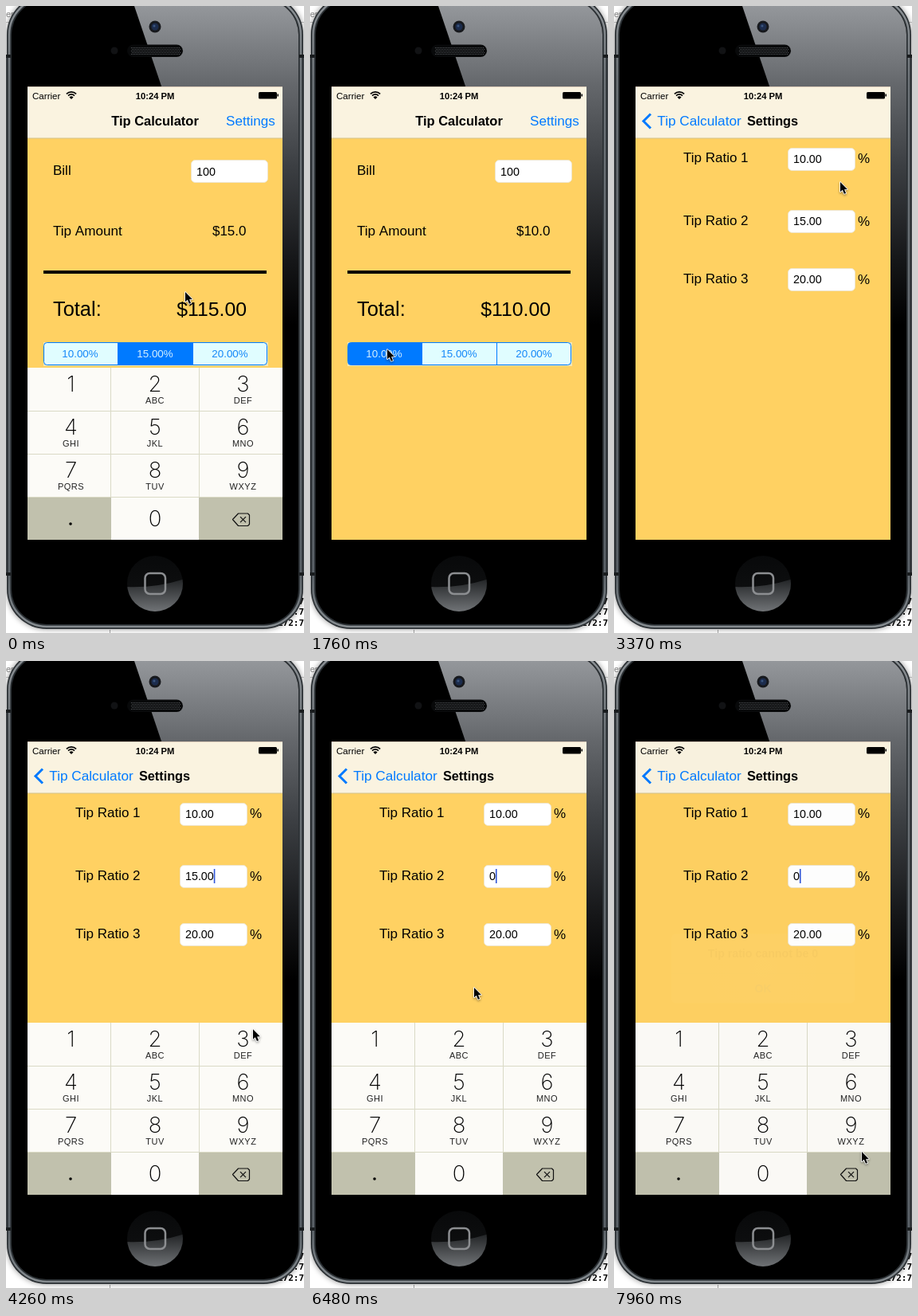
These frames come from a looping animation (374x787 px, 8 s). An HTML page with a canvas:

```html
<!DOCTYPE html>
<html lang="en">
<head>
<meta charset="utf-8">
<title>Tip Calculator</title>
<style>
html, body { margin: 0; width: 100%; height: 100%; overflow: hidden; background: #fff; }
canvas { display: block; width: 374px; height: 787px; }
</style>
</head>
<body>
<canvas id="stage" width="374" height="787"></canvas>
<script>
const canvas = document.getElementById('stage');
const W = 374, H = 787, LOOP = 8000;
const ratio = window.devicePixelRatio || 1;
canvas.width = W * ratio;
canvas.height = H * ratio;
let c = canvas.getContext('2d');

const SANS = '"Liberation Sans", Arial, sans-serif';
const THIN = 'Inter, "Liberation Sans", sans-serif';
const MONO = '"DejaVu Sans Mono", monospace';
const BLUE = '#007aff', YELLOW = '#ffd162', BAR = '#faf3e0', KEY = '#fcfbf7', GREY = '#c1c1ad';

const clamp = v => Math.max(0, Math.min(1, v));
const mix = (a, b, p) => a + (b - a) * p;
const ease = v => { const p = clamp(v); return p * p * (3 - 2 * p); };

function text(s, x, y, size, o = {}) {
  c.font = `${o.weight || 400} ${size}px ${o.family || SANS}`;
  c.textAlign = o.align || 'left';
  c.letterSpacing = (o.space || 0) + 'px';
  c.fillStyle = o.color || '#000';
  c.fillText(s, x, y);
  c.letterSpacing = '0px';
}

function box(x, y, w, h, color) {
  c.fillStyle = color;
  c.fillRect(x, y, w, h);
}

function round(x, y, w, h, r, fill, stroke, width = 1) {
  c.beginPath();
  c.roundRect(x, y, w, h, r);
  if (fill) { c.fillStyle = fill; c.fill(); }
  if (stroke) { c.strokeStyle = stroke; c.lineWidth = width; c.stroke(); }
}

function disc(x, y, r, fill) {
  c.beginPath();
  c.arc(x, y, r, 0, Math.PI * 2);
  c.fillStyle = fill;
  c.fill();
}

function path(points, close) {
  c.beginPath();
  points.forEach(([x, y], i) => i ? c.lineTo(x, y) : c.moveTo(x, y));
  if (close) c.closePath();
}

function layer(alpha, draw) {
  if (alpha <= 0) return;
  c.save();
  c.globalAlpha *= alpha;
  draw();
  c.restore();
}

function ramp(x0, y0, x1, y1, stops) {
  const g = c.createLinearGradient(x0, y0, x1, y1);
  stops.forEach(([p, color]) => g.addColorStop(p, color));
  return g;
}

// ---- phone ----
function homeButton() {
  disc(187, 725, 35, ramp(0, 690, 0, 730, [[0, '#08090a'], [1, '#0d0e0f']]));
  c.save();
  c.beginPath();
  c.arc(187, 725, 35, 0, Math.PI * 2);
  c.clip();
  c.beginPath();
  c.moveTo(150, 729);
  c.quadraticCurveTo(187, 731, 224, 719);
  c.lineTo(224, 762);
  c.lineTo(150, 762);
  c.fillStyle = ramp(0, 720, 0, 760, [[0, '#232527'], [1, '#707376']]);
  c.fill();
  c.restore();
  round(174.5, 712, 25.5, 26, 6, null, '#8c8e91', 2.5);
}

function phone() {
  box(0, 0, W, H, '#fff');
  text('er.', 0, 14, 11, { color: '#888' });
  box(0, 20, W, 1, '#c8c8c8');
  box(130, 783, 1, 4, '#aaa');
  [[':7', 751], ['.:7', 764], ['172:7', 778]].forEach(([s, y]) =>
    text(s, 374, y, 11, { weight: 700, family: MONO, align: 'right' }));

  box(0, 62, 3, 652, '#50565b');
  box(371, 62, 3, 652, '#50565b');
  c.save();
  c.shadowColor = 'rgba(0,0,0,.45)';
  c.shadowBlur = 7;
  round(1, -14, 372, 796, 50, '#2b3034');
  c.restore();
  round(4, -11, 366, 790, 47, null, ramp(0, 0, 0, 787,
    [[0, '#8b9094'], [0.12, '#6d7378'], [0.9, '#5d646a'], [1, '#8a9094']]), 2.5);
  [0, 368].forEach(x => [61, 711].forEach(y => box(x, y, 6, 4, '#191c1e')));

  c.save();
  round(7, -8, 360, 784, 44, '#000');
  c.clip();
  path([[161, 0], [374, 0], [374, 630]], true);
  c.fillStyle = ramp(0, 0, 0, 400, [[0, '#94979b'], [0.25, '#64676b'],
    [0.5, '#3c3f43'], [0.8, '#151618'], [1, '#000']]);
  c.fill();
  c.restore();

  disc(187, 26, 7.5, '#17191d');
  disc(187, 26, 4.5, '#1c2c4d');
  disc(186, 25, 1.5, '#3a5680');
  disc(136, 56, 4.5, '#111214');
  round(152, 48.5, 70, 15.5, 8, '#08090a');
  for (let y = 52; y < 61; y += 2)
    for (let x = 157; x < 218; x += 2) box(x + (y % 4) / 2, y, 1, 1, '#55585c');
  homeButton();
}

// ---- app ----
function field(x, y, w, value, baseline) {
  round(x, y, w, 28, 5, '#fff', '#efe5cc');
  text(value, x + 6.5, baseline, 14.3);
}

function segments(chosen) {
  const edges = [47.5, 140.5, 234.5, 327.5];
  box(47, 422, 282, 30, '#f5e6b4');
  c.save();
  c.beginPath();
  c.roundRect(47.5, 422.5, 280, 28, 4);
  c.clip();
  box(47, 422, 282, 30, '#e0fdff');
  box(edges[chosen], 422, edges[chosen + 1] - edges[chosen], 30, BLUE);
  box(140, 422, 1, 30, BLUE);
  box(234, 422, 1, 30, BLUE);
  c.restore();
  round(47.5, 422.5, 280, 28, 4, null, BLUE);
  ['10.00%', '15.00%', '20.00%'].forEach((s, i) =>
    text(s, 93 + i * 94, 441, 13.4, { align: 'center', color: i === chosen ? '#d4f0ff' : '#1688f8' }));
}

function calculator(chosen) {
  box(27, 166, 320, 504, YELLOW);
  text('Bill', 59, 212, 17);
  field(232.5, 193.5, 96, '100', 213);
  text('Tip Amount', 59, 288, 17.1);
  text(chosen ? '$15.0' : '$10.0', 301.5, 288, 17, { align: 'right' });
  box(47, 332, 280, 4, '#000');
  text('Total:', 59, 389, 25.4);
  text(chosen ? '$115.00' : '$110.00', 302, 389, 24.8, { align: 'right' });
  segments(chosen);
}

function settings(ratio2, caret, caretColor) {
  box(27, 166, 320, 504, YELLOW);
  [[178, '10.00'], [256, ratio2], [329, '20.00']].forEach(([y, value], i) => {
    const base = y + 18.5 + (i ? 0.5 : 0);
    text('Tip Ratio ' + (i + 1), 87, base - 0.5, 17);
    field(218.5, y + 0.5, 84, value, base);
    if (i === 1 && caret) {
      c.font = '14.3px ' + SANS;
      c.textAlign = 'left';
      box(225 + c.measureText(value).width, 261, 1.6, 18, caretColor);
    }
    text('%', 306, base + 0.5, 17);
  });
}

function statusBar() {
  text('Carrier', 33, 117, 11.6);
  c.strokeStyle = '#000';
  c.lineWidth = 1.7;
  [5.6, 8.6].forEach(r => {
    c.beginPath();
    c.arc(82, 116.5, r, -Math.PI * 0.75, -Math.PI * 0.25);
    c.stroke();
  });
  c.beginPath();
  c.moveTo(82, 117);
  c.arc(82, 117, 3.6, -Math.PI * 0.75, -Math.PI * 0.25);
  c.fillStyle = '#000';
  c.fill();
  text('10:24 PM', 187, 117, 11.2, { weight: 700, align: 'center' });
  round(317, 108, 23, 8.5, 1.5, '#000');
  box(340.5, 110.5, 1.5, 3, '#000');
}

function navBar(push, pressed, tint) {
  box(27, 101, 320, 65, BAR);
  box(27, 101, 320, 1, '#d9c9b8');
  box(27, 165.5, 320, 1, '#d3c18c');
  statusBar();
  const slide = mix(187, 107, push);
  layer(1 - push, () => {
    text('Tip Calculator', slide, 150, 16.5, { weight: 700, align: 'center' });
    layer((pressed ? 0.2 : 1) * (1 - push), () => text('Settings', 276, 150, 17.1, { color: BLUE }));
  });
  layer(push, () => {
    text('Tip Calculator', slide, 150, 17.2, { align: 'center', color: tint });
    text('Settings', mix(347, 199, push), 150, 16.3, { weight: 700, align: 'center' });
    path([[46, 135.5], [37, 144.5], [46, 153.5]]);
    c.strokeStyle = tint;
    c.lineWidth = 3;
    c.stroke();
  });
}

function keyboard(drop, pressed) {
  if (drop >= 216) return;
  const letters = ['', 'ABC', 'DEF', 'GHI', 'JKL', 'MNO', 'PQRS', 'TUV', 'WXYZ'];
  const mids = [81.5, 187, 297.5];
  c.save();
  c.translate(0, drop);
  box(27, 454, 320, 216, KEY);
  box(27, 616, 105, 54, GREY);
  if (pressed !== 'delete') box(242, 616, 105, 54, GREY);
  if (pressed === '0') box(132, 616, 110, 54, GREY);
  [508, 562, 616].forEach(y => box(27, y, 320, 1, '#dadac6'));
  box(131, 454, 1, 162, '#dadac6');
  box(242, 454, 1, 162, '#dadac6');
  const digit = (s, x, y) => text(s, x, y, 27.5, { weight: 250, family: THIN, align: 'center' });
  letters.forEach((s, i) => {
    const x = mids[i % 3], y = 484 + 54 * Math.floor(i / 3);
    digit(String(i + 1), x, y);
    text(s, x, y + 15, 11, { align: 'center', space: 0.5, color: '#222' });
  });
  digit('0', 187, 653);
  disc(81, 650, 1.8, '#000');
  path([[284.5, 644.5], [291.5, 637], [303.5, 637], [305.5, 639], [305.5, 650.5],
    [303.5, 652.5], [291.5, 652.5]], true);
  c.strokeStyle = '#111';
  c.lineWidth = 1.2;
  c.lineJoin = 'round';
  c.stroke();
  path([[294, 641.2], [301, 648.2]]);
  c.stroke();
  path([[301, 641.2], [294, 648.2]]);
  c.stroke();
  c.restore();
}

function alertBox(alpha, scale, pressed) {
  layer(alpha * 0.37, () => box(27, 101, 320, 569, '#000'));
  layer(alpha, () => {
    c.translate(187, 386);
    c.scale(scale, scale);
    c.translate(-187, -386);
    round(49, 333.5, 276, 105, 7, 'rgba(240,234,218,.9)');
    const glow = c.createRadialGradient(187, 385, 10, 187, 385, 110);
    glow.addColorStop(0, 'rgba(255,252,242,.45)');
    glow.addColorStop(1, 'rgba(255,252,242,0)');
    round(49, 333.5, 276, 105, 7, glow);
    if (pressed) round(49, 394, 276, 44.5, [0, 0, 7, 7], 'rgba(190,184,165,.5)');
    box(49, 393, 276, 1, '#cfc7ae');
    text('Tip ratio cannot be 0', 187, 369, 17, { weight: 700, align: 'center', color: '#111' });
    text('OK', 187, 422, 16.8, { weight: 700, align: 'center', color: BLUE });
  });
}

// ---- pointer: [step, x, y] ----
const route = [
  [0, 225, 359], [1, 225, 359], [5, 301, 167], [7, 300, 150], [8, 280, 185],
  [11, 100, 428], [13, 94, 434], [16, 296, 119], [17, 296, 132], [19, 296, 138],
  [20, 296, 140], [23, 284, 221], [25, 262, 265], [27, 262, 267], [30, 334, 560],
  [32, 296, 640], [38, 296, 640], [40, 226, 643], [41, 192, 643], [42, 192, 643],
  [44, 206, 410], [50, 206, 410], [54, 311, 616]
];

function pointer(n) {
  const i = Math.max(1, route.findIndex(k => k[0] >= n));
  const [n0, x0, y0] = route[i - 1], [n1, x1, y1] = route[i];
  const p = clamp((n - n0) / (n1 - n0));
  c.save();
  c.translate(mix(x0, x1, p), mix(y0, y1, p));
  c.scale(0.82, 0.82);
  path([[0, 0], [0, 15], [3.4, 12], [6, 18], [8.6, 17], [6.2, 11.2], [10.8, 11]], true);
  c.shadowColor = 'rgba(0,0,0,.4)';
  c.shadowBlur = 3;
  c.shadowOffsetY = 1.5;
  c.lineJoin = 'round';
  c.lineWidth = 2;
  c.strokeStyle = '#fff';
  c.stroke();
  c.shadowColor = 'transparent';
  c.fillStyle = '#000';
  c.fill();
  c.restore();
}

const deletes = [33, 34, 35, 37, 38];

function ratioText(n) {
  if (n >= 42) return '0';
  return '15.00'.slice(0, 5 - deletes.filter(k => n >= k).length);
}

function app(n) {
  const push = ease((n - 18.8) / 3.2);
  const edge = 320 * (1 - push);
  const gone = clamp((n - 50) / 4.1);
  const shown = n < 46 ? 0 : n < 47 ? 0.5 : 1 - gone;
  const dimmed = shown > 0.4;

  c.save();
  c.beginPath();
  c.rect(27, 101, 320, 569);
  c.clip();
  if (push < 1) {
    c.save();
    c.translate(-96 * push, 0);
    calculator(n < 12 ? 1 : 0);
    c.restore();
    layer(0.1 * push, () => box(27, 166, 320, 504, '#000'));
  }
  if (push > 0) {
    c.save();
    c.translate(edge, 0);
    if (push < 1) box(19, 166, 8, 504, ramp(19, 0, 27, 0, [[0, 'rgba(0,0,0,0)'], [1, 'rgba(0,0,0,.22)']]));
    const caret = n >= 26 && n !== 30 && n !== 31;
    settings(ratioText(n), caret, dimmed ? '#555' : '#2f55d8');
    c.restore();
  }
  navBar(push, n >= 18, dimmed ? '#8f8c84' : BLUE);

  const drop = n < 20 ? ease((n - 0.5) / 4) : 1 - ease((n - 25.5) / 3.5);
  keyboard(216 * drop, deletes.includes(n) ? 'delete' : n === 42 ? '0' : '');
  alertBox(shown, n < 47 ? 1.12 : 1 - 0.17 * gone, n === 50);
  c.restore();
}

// The phone never changes, so it is painted once.
const backdrop = document.createElement('canvas');
backdrop.width = canvas.width;
backdrop.height = canvas.height;
const main = c;
c = backdrop.getContext('2d');
c.scale(ratio, ratio);
phone();
c = main;
c.scale(ratio, ratio);

function draw(now) {
  const n = Math.min(54, Math.floor((now % LOOP + 35) / 147.4));
  c.drawImage(backdrop, 0, 0, W, H);
  app(n);
  pointer(n);
}

const start = performance.now();
function tick() {
  draw(performance.now() - start);
  requestAnimationFrame(tick);
}
tick();
</script>
</body>
</html>
```
